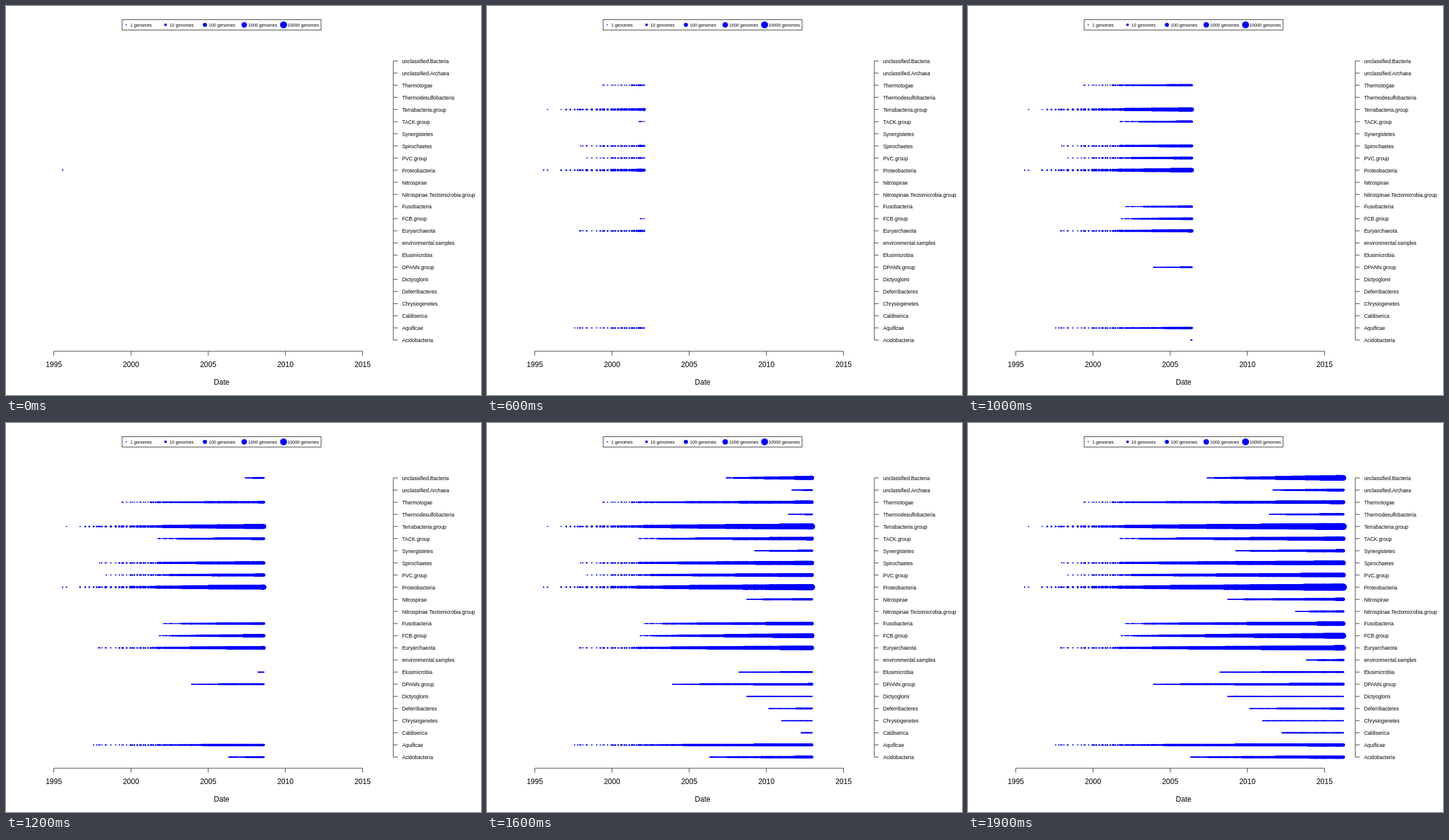
Animation, 780 px wide and 640 px high, one loop 3000 ms. Source, as an HTML page with a canvas:

```html
<!DOCTYPE html>
<html lang="en">
<head>
<meta charset="utf-8">
<title>Genomes by date</title>
<style>
  html, body { margin: 0; width: 100%; height: 100%; overflow: hidden; background: #fff; }
  svg, canvas { position: absolute; left: 0; top: 0; display: block; }
  text { font-family: "Liberation Sans", Arial, sans-serif; fill: #000; }
  path, rect { fill: none; stroke: #000; stroke-width: 0.75; }
  circle { fill: #00f; }
</style>
</head>
<body>
<svg id="chart" width="780" height="640"></svg>
<canvas id="dots" width="780" height="640"></canvas>
<script>
const STEP = 100, LAST = 19, LOOP = 3000;
const X_FIRST = 93, X_LAST = 616.4;
const TOP = 90.37, ROW = 19.968, AXIS_X = 636, AXIS_Y = 568, TICK = 7.2;
const R_MIN = 1.1, R_STEP = 0.4;
const svg = document.getElementById('chart');
const ctx = document.getElementById('dots').getContext('2d');

// Group, x of its first genome, dot radius at the end.
const groups = [
  ['unclassified.Bacteria', 393, 4.7],
  ['unclassified.Archaea', 501, 2.4],
  ['Thermotogae', 190.5, 3],
  ['Thermodesulfobacteria', 495, 2],
  ['Terrabacteria.group', 99.5, 5.7],
  ['TACK.group', 250, 3.5],
  ['Synergistetes', 440, 2.6],
  ['Spirochaetes', 154, 4],
  ['PVC.group', 164.5, 3.7],
  ['Proteobacteria', 93, 5.9],
  ['Nitrospirae', 427, 2.6],
  ['Nitrospinae.Tectomicrobia.group', 538, 1.8],
  ['Fusobacteria', 259, 3.6],
  ['FCB.group', 252, 4.8],
  ['Euryarchaeota', 152, 4.2],
  ['environmental.samples', 556, 1.8],
  ['Elusimicrobia', 414, 1.7],
  ['DPANN.group', 305, 2.5],
  ['Dictyoglomi', 427, 1.3],
  ['Deferribacteres', 463, 1.8],
  ['Chrysiogenetes', 484, 1.3],
  ['Caldiserica', 516, 1.3],
  ['Aquificae', 144, 2.7],
  ['Acidobacteria', 366, 2.9],
].map(([name, from, size], i) => ({ name, from, size, y: TOP + i * ROW }));

function add(tag, attrs, text) {
  const el = document.createElementNS('http://www.w3.org/2000/svg', tag);
  for (const key in attrs) el.setAttribute(key, attrs[key]);
  if (text) el.textContent = text;
  svg.appendChild(el);
}

function label(text, x, y, size, anchor = 'start') {
  add('text', { x, y, 'font-size': size, 'text-anchor': anchor }, text);
}

const line = d => add('path', { d });

function drawLegend() {
  add('rect', { x: 190.8, y: 22.4, width: 326.4, height: 17.28 });
  for (let i = 0; i < 5; i++) {
    const x = 197.4 + i * 64.6;
    add('circle', { cx: x, cy: 31, r: 0.9 + i * 1.23 });
    label(`${10 ** i} genomes`, x + 6.5, 33.7, 7.2);
  }
}

function drawAxes() {
  line(`M78.5 ${AXIS_Y}h507M${AXIS_X} ${TOP}v${ROW * (groups.length - 1)}`);
  for (let i = 0; i < 5; i++) {
    const x = 78.5 + i * 126.75;
    line(`M${x} ${AXIS_Y}v${TICK}`);
    label(String(1995 + i * 5), x, 594, 12, 'middle');
  }
  label('Date', 354, 622.8, 12, 'middle');
  for (const { name, y } of groups) {
    line(`M${AXIS_X} ${y}h${TICK}`);
    label(name, AXIS_X + 2 * TICK, y + 3.5, 8.4);
  }
}

// Every group's first date, plus seeded ones whose gaps shrink over time.
function makeDates() {
  const list = groups.map(g => g.from);
  let seed = 7;
  const random = () => (seed = seed * 16807 % 2147483647) / 2147483647;
  for (let x = X_FIRST; x < X_LAST;) {
    list.push(x);
    const gap = Math.max(0.8, 16 * Math.exp((X_FIRST - x) / 83));
    x += gap * (0.4 + 1.2 * random());
  }
  list.push(X_LAST);
  return list;
}

// Radii grow evenly from the first date, in small steps.
function radius({ from, size }, x) {
  const growth = (size - R_MIN) * (x - from) / (X_LAST - from);
  return R_MIN + Math.round(growth / R_STEP) * R_STEP;
}

function drawDots(step) {
  const limit = X_FIRST + (X_LAST - X_FIRST) * step / LAST + 0.01;
  ctx.clearRect(0, 0, 780, 640);
  ctx.fillStyle = '#00f';
  for (const group of groups) {
    for (const x of dates) {
      if (x < group.from || x > limit) continue;
      ctx.beginPath();
      ctx.arc(x, group.y, radius(group, x), 0, Math.PI * 2);
      ctx.fill();
    }
  }
}

drawLegend();
drawAxes();
const dates = makeDates();
const start = performance.now();
let shown = -1;

function tick() {
  const time = (performance.now() - start) % LOOP;
  const step = Math.min(LAST, Math.floor(time / STEP));
  if (step !== shown) drawDots(shown = step);
  requestAnimationFrame(tick);
}
tick();
</script>
</body>
</html>
```
